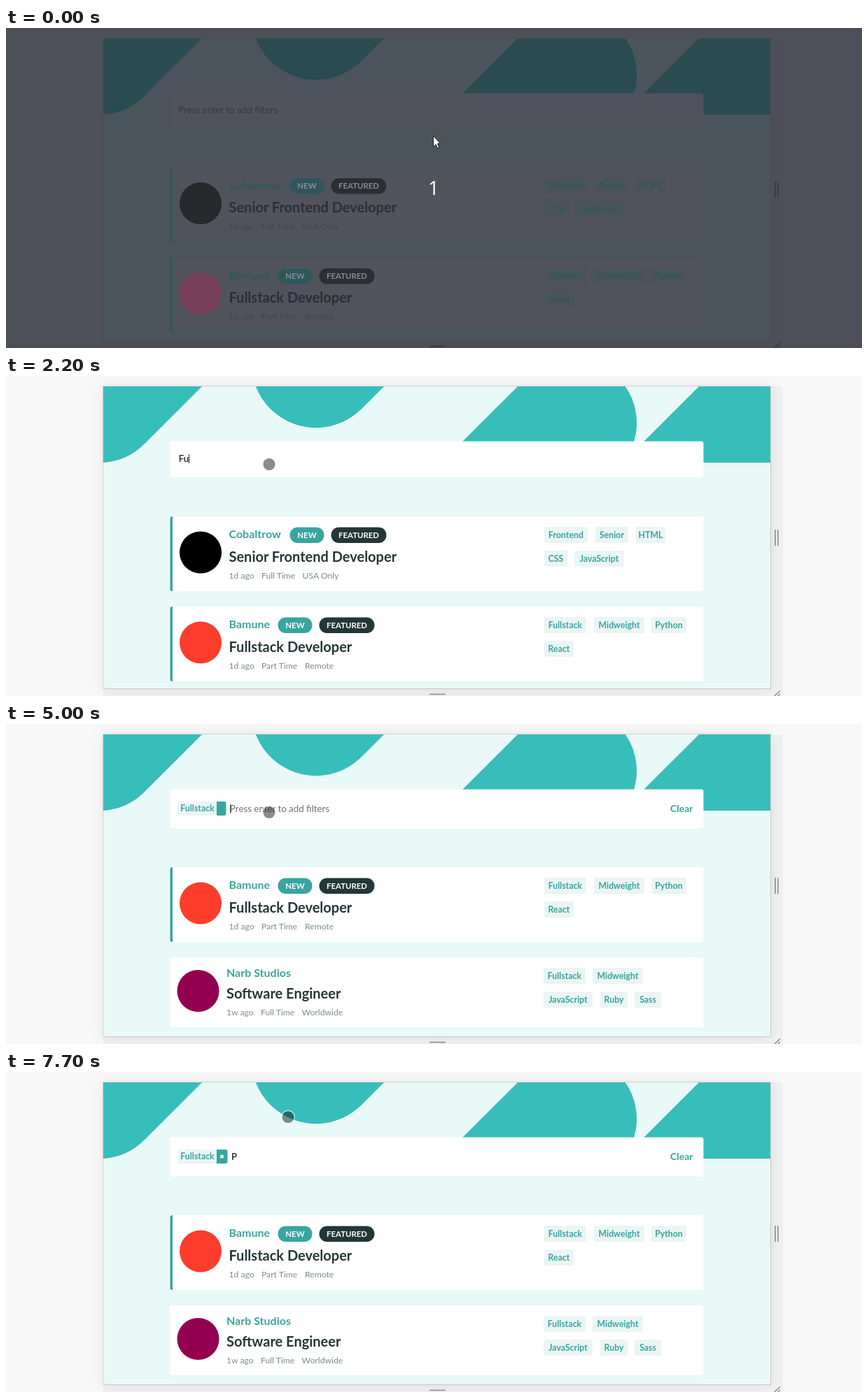
An HTML page that plays this animation: 1223 by 458 pixels, repeating every 8000 ms.

```html
<!DOCTYPE html>
<html lang="en">
<head>
<meta charset="utf-8">
<title>Job filter</title>
<style>
  :root {
    --bg: #f8f8f8; --strip: #f0f0f0; --page: #e8f9f7; --teal: #37bebb; --card: #fff;
    --accent: #38a5a0; --dark: #243737; --meta: #7a8d8c; --tag: #eaf5f4; --hint: #707070;
    --grip: #888; --label: #fff; --black: #000; --red: #fd3d2b; --plum: #930050;
  }
  .dim {
    --bg: #4d5058; --strip: #4c4f57; --page: #4b545a; --teal: #2a4b50; --card: #50535b;
    --accent: #2f575b; --dark: #2b2e33; --meta: #3f464c; --tag: #4b535a; --hint: #34383e;
    --grip: #34373d; --label: #868d93; --black: #27292d; --red: #783f59;
  }
  html, body { margin: 0; width: 100%; height: 100%; overflow: hidden; background: var(--bg); }
  svg { display: block; width: 100%; height: 100%; background: var(--bg); }
  text { font-family: Lato, "Open Sans", sans-serif; white-space: pre; }
  .company { font-size: 16px; font-weight: 700; fill: var(--accent); }
  .title { font-size: 20px; font-weight: 700; fill: var(--dark); }
  .meta { font-size: 12.2px; fill: var(--meta); }
  .pill { font-size: 11.4px; font-weight: 700; fill: var(--label); text-anchor: middle; }
  .tag { font-size: 12.3px; font-weight: 700; fill: var(--accent); text-anchor: middle; }
  .input { font-size: 13.3px; }
  .clear { font-size: 14px; font-weight: 700; fill: var(--accent); }
  .count { font: 28px "Open Sans", sans-serif; fill: #fff; text-anchor: middle; }
  .page { filter: drop-shadow(0 0 9px rgba(0, 0, 0, .09)); }
  .dim .page { filter: none; }
  .dim .edge { opacity: .3; }
</style>
</head>
<body>
<svg viewBox="0 0 1223 458">
  <rect x="139" y="15" width="971" height="443" fill="var(--strip)"/>
  <rect class="page" x="139" y="15" width="953" height="432" fill="var(--page)"/>
  <rect class="edge" x="138.5" y="14.5" width="954" height="433" fill="none" stroke="#000" stroke-opacity=".12"/>
  <path fill="var(--teal)" d="M139 15H280L198 97A92 92 0 0 1 139 124Z
    M357 15A92 92 0 0 0 508 47L540 15Z
    M646 100L731 15H885A92 92 0 0 1 895 100Z
    M881 124L990 15H1092V124Z"/>
  <path d="M1099 220V243M1103 220V243M605 455.5H628M1098 458L1106 450.5M1103 458L1106 455"
    fill="none" stroke="var(--grip)" stroke-width="1.5"/>
  <rect id="box" x="234.5" y="93.5" width="762" rx="3" fill="var(--card)"/>
  <g id="chip">
    <rect x="245" y="111" width="60" height="20" rx="3" fill="var(--tag)"/>
    <text class="tag" x="273.5" y="124.7">Fullstack</text>
    <path id="remove" fill="var(--accent)"/>
    <path id="cross" d="M306.3 118.8l4.4 4.4m0-4.4l-4.4 4.4" stroke="#fff" stroke-width="1.8"/>
    <text class="clear" x="949" y="125.7">Clear</text>
  </g>
  <text id="input" class="input"></text>
  <rect id="caret" width="1" height="13" fill="#333"/>
  <g id="all"></g>
  <g id="filtered"></g>
  <g id="dot">
    <circle r="9.3" fill="none" stroke="#fff" stroke-opacity=".65" stroke-width="1.5"/>
    <circle r="8.6" fill="#000" fill-opacity=".45"/>
  </g>
  <g id="intro">
    <text class="count" x="611" y="239">1</text>
    <path d="M610.5 154V170L614.1 166.6 616.7 172 618.9 171 616.5 165.6H620.5Z" fill="#fff" stroke="#1c1c1c"/>
  </g>
</svg>
<script>
const LOOP = 8000;
const HINT = 'Press enter to add filters';
const $ = id => document.getElementById(id);

function add(parent, name, attrs, content = '') {
  const node = document.createElementNS('http://www.w3.org/2000/svg', name);
  for (const key in attrs) node.setAttribute(key, attrs[key]);
  node.textContent = content;
  parent.append(node);
}
const write = (parent, cls, x, y, words) => add(parent, 'text', { class: cls, x, y }, words);

function badge(parent, cls, [words, x, width], y, height, rx, fill) {
  add(parent, 'rect', { x, y, width, height, rx, fill });
  write(parent, cls, x + width / 2, y + height / 2 + 4, words);
}

function card(parent, top, job) {
  const { featured } = job;
  const left = featured ? 318.5 : 315;
  const lift = featured ? 0 : 6;
  const height = featured ? 107 : 100;
  add(parent, 'rect', { x: 234.5, y: top, width: 762, height, rx: 3, fill: 'var(--card)' });
  if (featured) {
    add(parent, 'path', { d: `M238 ${top}v${height}h-.5q-3 0 -3 -3v-${height - 6}q0 -3 3 -3z`, fill: 'var(--accent)' });
    badge(parent, 'pill', ['NEW', job.pillX, 49], top + 15.5, 22.5, 11.2, 'var(--accent)');
    badge(parent, 'pill', ['FEATURED', job.pillX + 59, 79], top + 15.5, 22.5, 11.2, 'var(--dark)');
  }
  add(parent, 'circle', { cx: left - 40.5, cy: top + (featured ? 51.5 : 48), r: 30, fill: job.logo });
  write(parent, 'company', left, top + (featured ? 31.2 : 27.6), job.company);
  write(parent, 'title', left, top + 64.5 - lift, job.title);
  for (const [words, x] of job.meta) write(parent, 'meta', x, top + 88.8 - lift, words);
  job.tags.forEach((row, i) => row.forEach(tag =>
    badge(parent, 'tag', tag, top + 15 + i * 34, 23, 3, 'var(--tag)')));
}

const frontend = {
  company: 'Cobaltrow', title: 'Senior Frontend Developer', logo: 'var(--black)', featured: true, pillX: 405.5,
  meta: [['1d ago', 318.5], ['Full Time', 365], ['USA Only', 423.5]],
  tags: [[['Frontend', 769, 62], ['Senior', 842, 47], ['HTML', 900, 42]], [['CSS', 769, 33], ['JavaScript', 812, 71]]]
};
const fullstack = {
  company: 'Bamune', title: 'Fullstack Developer', logo: 'var(--red)', featured: true, pillX: 388.5,
  meta: [['1d ago', 318.5], ['Part Time', 365], ['Remote', 427]],
  tags: [[['Fullstack', 769, 60], ['Midweight', 840, 72], ['Python', 922, 50]], [['React', 769, 42]]]
};
const engineer = {
  company: 'Narb Studios', title: 'Software Engineer', logo: 'var(--plum)', featured: false,
  meta: [['1w ago', 315], ['Full Time', 364], ['Worldwide', 422.5]],
  tags: [[['Fullstack', 768, 60], ['Midweight', 838, 72]], [['JavaScript', 768, 70], ['Ruby', 849, 39], ['Sass', 898, 38]]]
};
card($('all'), 199.5, frontend);
card($('all'), 328.5, fullstack);
card($('filtered'), 205, fullstack);
card($('filtered'), 334, engineer);

// Each row: time in ms, then the value held until the next row.
const pointer = [
  [0, 611, 156], [200, 580, 151], [300, 506, 138], [400, 438, 129], [500, 411, 127],
  [700, 377, 125], [800, 371.5, 124.7], [1100, 373, 125], [1200, 375, 126], [1300, 376, 126.3],
  [5500, 377, 121], [5600, 379, 106], [5800, 385, 90], [5900, 391, 80],
  [6100, 397, 72], [6300, 401, 68], [6500, 404, 65], [6600, 403, 64.5]
];
const typed = [
  [0, ''], [1700, 'F'], [2200, 'Fu'], [2500, 'Ful'], [2600, 'Full'], [2800, 'Fulls'], [3100, 'Fullst'],
  [3300, 'Fullsta'], [3400, 'Fullstac'], [4300, 'Fullstack'], [5000, ''], [7200, 'P']
];
const caretOn = [
  [0, false], [1000, true], [1400, false], [1700, true], [3900, false], [4300, true], [4800, false],
  [5000, true], [5500, false], [6100, true], [6600, false], [7100, true], [7700, false]
];
const held = (table, t) => table.findLast(row => row[0] <= t);
const show = (id, on) => { $(id).style.display = on ? '' : 'none'; };

function render(t) {
  const dim = t < 100, focused = t >= 1000, filtered = t >= 5000, iconReady = t >= 5800;
  document.documentElement.classList.toggle('dim', dim);
  show('intro', dim);
  show('dot', !dim);
  show('all', !filtered);
  show('filtered', filtered);
  show('chip', filtered);
  show('cross', iconReady);

  const [, x, y] = held(pointer, t);
  $('dot').setAttribute('transform', `translate(${x} ${y})`);
  $('all').setAttribute('transform', `translate(0 ${focused ? 1.5 : 0})`);
  $('box').setAttribute('height', filtered ? 56 : focused ? 51.5 : 50);
  $('remove').setAttribute('d', `M301 111h${iconReady ? 12.5 : 10.5}q3 0 3 3v14q0 3 -3 3H301z`);

  const words = held(typed, t)[1];
  const left = filtered ? (iconReady ? 322 : 320) : focused ? 246.7 : 246;
  const base = filtered ? 125.7 : focused ? 123 : 122;
  const input = $('input');
  input.textContent = words || HINT;
  input.setAttribute('x', left);
  input.setAttribute('y', base);
  input.setAttribute('fill', words ? '#000' : 'var(--hint)');
  show('caret', held(caretOn, t)[1]);
  $('caret').setAttribute('x', Math.round(left + (words ? input.getComputedTextLength() : -.5)));
  $('caret').setAttribute('y', Math.round(base - 11));
}

const start = performance.now();
function tick() {
  render((performance.now() - start) % LOOP);
  requestAnimationFrame(tick);
}
tick();
</script>
</body>
</html>
```
